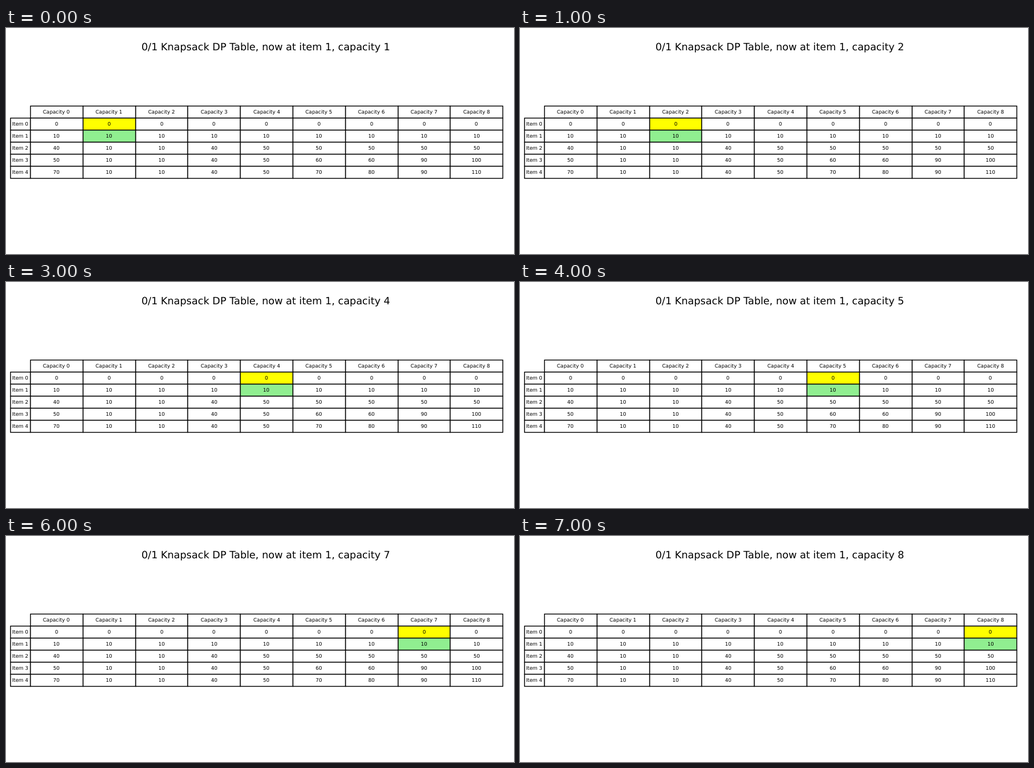
Write an HTML page with a canvas that moves like this. It is 840 px wide and 375 px high and loops after 8000 ms.

```html
<!DOCTYPE html>
<html lang="en">
<head>
<meta charset="utf-8">
<title>0/1 Knapsack DP Table</title>
<style>
  html, body { margin: 0; width: 100%; height: 100%; overflow: hidden; background: #fff; }
  canvas { display: block; }
</style>
</head>
<body>
<canvas id="stage" width="840" height="375"></canvas>
<script>
const ctx = document.getElementById('stage').getContext('2d');
const FONT = '"DejaVu Sans", sans-serif';
const STEP = 1000, CAPACITY = 8, ITEM = 1;
const LEFT = 40, TOP = 129, COL_W = 86.8, ROW_H = 20, LABEL_X = 7;
const items = [
  { value: 0, weight: 0 },
  { value: 10, weight: 1 },
  { value: 40, weight: 3 },
  { value: 50, weight: 4 },
  { value: 70, weight: 5 },
];

// Best value reachable with items 1..i within the given capacity.
function best(i, capacity) {
  if (i === 0) return 0;
  const { value, weight } = items[i];
  const skip = best(i - 1, capacity);
  return weight > capacity ? skip : Math.max(skip, value + best(i - 1, capacity - weight));
}

// The first column shows each item's own value.
const entry = (i, c) => c === 0 ? items[i].value : best(i, c);
const table = items.map((_, i) => Array.from({ length: CAPACITY + 1 }, (_, c) => entry(i, c)));

const colX = c => c < 0 ? LABEL_X : Math.round(LEFT + c * COL_W);

function setFont(size) {
  ctx.font = `${size}px ${FONT}`;
  ctx.textRendering = 'geometricPrecision';
  ctx.fillStyle = '#000';
}

function text(str, x, y, size) {
  setFont(size);
  ctx.fillText(str, x, y);
}

// Centres by inked width and starts on a whole pixel.
function centred(str, x, y, size) {
  setFont(size);
  const m = ctx.measureText(str);
  const ink = m.actualBoundingBoxLeft + m.actualBoundingBoxRight;
  ctx.fillText(str, Math.round(x - ink / 2), y);
}

// Column -1 holds the row labels, row 0 the column headings.
function cell(row, col, str, fill = '#fff') {
  const x = colX(col) + 0.5, y = TOP + row * ROW_H + 0.5;
  const box = [x, y, colX(col + 1) + 0.5 - x, ROW_H];
  ctx.fillStyle = fill;
  ctx.fillRect(...box);
  ctx.lineWidth = 1.39;
  ctx.strokeRect(...box);
  const base = TOP + row * ROW_H + 13;
  if (col < 0) text(str, LABEL_X + 3, base, 8.333);
  else centred(str, LEFT + (col + 0.5) * COL_W, base, 8.333);
}

function draw(capacity) {
  ctx.fillStyle = '#fff';
  ctx.fillRect(0, 0, 840, 375);
  text(`0/1 Knapsack DP Table, now at item ${ITEM}, capacity ${capacity}`, 224, 37, 16.667);
  table[0].forEach((_, c) => cell(0, c, `Capacity ${c}`));
  table.forEach((values, i) => {
    cell(i + 1, -1, `Item ${i}`);
    values.forEach((value, c) => {
      const active = c === capacity;
      const fill = active && i === ITEM ? '#90ee90'
        : active && i === ITEM - 1 ? '#ff0' : '#fff';
      cell(i + 1, c, value, fill);
    });
  });
}

function frame() {
  draw(1 + Math.floor(performance.now() / STEP) % CAPACITY);
  requestAnimationFrame(frame);
}
frame();
</script>
</body>
</html>
```
